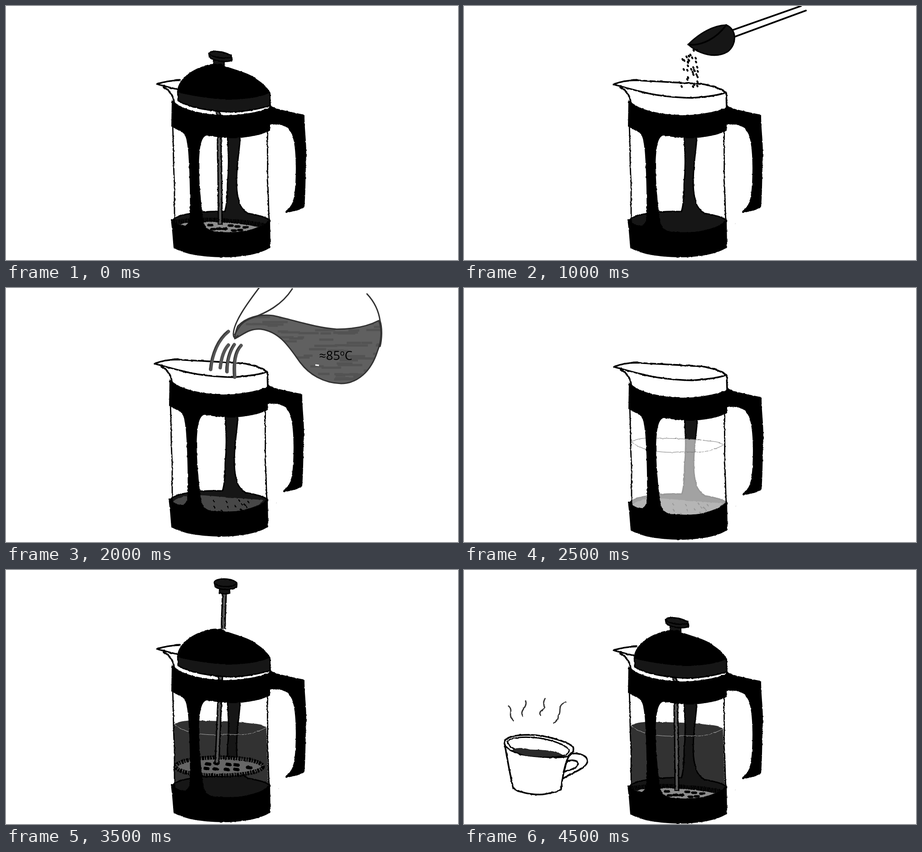
These frames come from a looping animation (998 by 561 pixels, 5000 ms). An HTML page:

```html
<!DOCTYPE html>
<html lang="en">
<head>
<meta charset="utf-8">
<title>French press coffee</title>
<style>
  html, body { margin: 0; width: 100%; height: 100%; overflow: hidden; background: #fff; }
  svg { display: block; width: 100%; height: 100%; }
  .scene { visibility: hidden; animation: show 5s step-end infinite; animation-delay: calc((var(--step) - 10) * .5s); }
  @keyframes show { 0% { visibility: visible; } 10%, 100% { visibility: hidden; } }
  .line { fill: none; stroke: #000; stroke-width: 3.6; stroke-linecap: round; stroke-linejoin: round; }
  .dark { fill: #161616; stroke: #000; stroke-width: 3; stroke-linejoin: round; }
  .thin { stroke-width: 2.8; }
  .grey { stroke: #333; stroke-width: 3; }
  .rod { fill: none; stroke: #000; stroke-width: 11; }
  .core { fill: none; stroke: #575757; stroke-width: 5; }
  .stream { fill: none; stroke: #555; stroke-width: 7.5; stroke-linecap: round; }
  .surface { fill: none; stroke: #aaa; stroke-width: 1; }
  text { font: 27px "Open Sans", "Noto Sans", sans-serif; }
</style>
</head>
<body>
<svg viewBox="0 0 998 561">
  <defs>
    <filter id="ink" filterUnits="userSpaceOnUse" x="0" y="-20" width="998" height="600">
      <feTurbulence type="fractalNoise" baseFrequency=".14" numOctaves="2" seed="4"/>
      <feDisplacementMap in="SourceGraphic" scale="3" xChannelSelector="R" yChannelSelector="G"/>
    </filter>

    <g id="back">
      <path class="dark" d="M365 470C378 456 430 449 480 451C483 442 486 420 486 390C490 350 488 320 486 285H514C513 310 509 330 507 360C505 395 506 415 514 437C519 446 524 451 531 455C555 459 574 465 579 470C560 505 390 515 365 470Z"/>
    </g>

    <g id="front">
      <path class="line thin" d="M365 260C367 300 366 350 369 390V472M575 270C573 310 576 340 574 380C577 410 576 440 578 470"/>
      <path d="M363 205C380 219 398 227 425 232C450 237 475 239 495 238C530 236 560 229 577 222L581 217L590 222C610 228 634 233 656 237C656 270 660 290 660 325C658 365 659 400 656 441C651 447 632 450 617 454Q611 454 617 447C631 439 634 419 636 390C638 350 637 310 630 285C623 264 610 256 580 259L580 272C562 282 530 288 500 289C478 289 460 286 440 283C427 286 424 312 423 350C424 400 428 430 432 468C435 484 441 492 455 495C485 498 520 497 540 491C558 486 570 481 580 467L581 530C557 547 510 552 475 552C430 551 392 546 367 531L364 495L361 469L366 468C371 480 385 484 394 481C400 478 402 471 403 462C404 410 402 350 399 315C396 290 393 278 384 275L362 263Z"/>
      <path class="line" d="M345 176C357 183 367 194 368 210M579 188L580 222"/>
      <circle cx="599" cy="478" r=".8" fill="#ccc"/>
    </g>

    <path id="rim" class="line" d="M330 170C345 164 362 161 382 161C440 165 505 167 530 170C552 174 568 181 578 188C560 195 535 198 503 200C460 199 420 194 390 186C365 180 345 174 330 170Z"/>

    <g id="lid">
      <path class="line" d="M381 161C365 161 345 165 330 169C345 174 360 177 378 182"/>
      <path class="dark" d="M376 183L377 206C400 220 440 229 495 231C530 230 560 223 580 217L579 188Z"/>
      <path d="M375 188C375 160 404 139 435 129C455 123 470 123 482 130C510 140 536 146 551 159C565 168 576 179 580 188C560 200 520 203 490 204C440 202 405 194 375 188Z"/>
    </g>

    <g id="lowKnob">
      <path d="M455 116L480 121L478 129H454Z" fill="#161616" stroke="#000" stroke-width="2"/>
      <path class="dark" d="M445 101C450 95 474 96 494 106L495 117C486 122 455 119 446 110Z"/>
      <path class="line thin" d="M446 102C455 112 480 114 494 110"/>
    </g>

    <g id="highKnob">
      <path class="rod" stroke-width="10" d="M479 46C479 75 476 100 477 126"/>
      <path class="core" d="M479 48C479 75 476 100 477 126"/>
      <path class="dark" d="M469 34L468 46Q480 49 491 46L490 35Z"/>
      <path class="dark" d="M457 22C460 12 496 12 507 24L506 33C495 41 468 39 459 32Z"/>
      <path class="line thin" d="M457 24C466 34 495 34 507 25"/>
    </g>

    <g id="lowRod">
      <path class="rod" d="M465 230C471 260 466 300 469 350L470 480"/>
      <path class="core" d="M465 230C471 260 466 300 469 350L470 478"/>
    </g>
    <g id="highRod">
      <path class="rod" d="M471 230L464 400L463 424"/>
      <path class="core" d="M471 230L464 400L463 420"/>
    </g>

    <g id="grounds">
      <path fill="#474747" d="M371 475C384 460 420 460 440 461C480 464 530 469 570 471C563 486 520 498 480 498C420 495 380 491 371 475Z"/>
      <path id="specks" class="line" stroke-width="2.4" style="stroke-width:2.4"/>
    </g>

    <g id="pressed">
      <path fill="#8c8c8c" d="M431 475C470 472 525 478 553 485C540 491 518 498 475 497C449 495 438 489 431 475ZM382 481Q391 474 400 476L398 481Z"/>
      <path d="M372 474C425 465 510 470 568 482" fill="none" stroke="#000" stroke-width="10" stroke-dasharray="3 1.6 2 1"/>
      <path id="pressedHoles" class="line" style="stroke-width:5.5"/>
    </g>

    <g id="raised">
      <ellipse cx="468" cy="429" rx="97" ry="21" fill="#666"/>
      <ellipse cx="468" cy="429" rx="96" ry="20" fill="none" stroke="#000" stroke-width="9" stroke-dasharray="5 1.5 3 2"/>
      <path id="raisedHoles" class="line" style="stroke-width:7"/>
    </g>

    <path id="volume" d="M368 336C380 328 402 326 430 328C470 328 510 330 539 334C560 335 570 339 572 343L577 470C530 510 400 510 368 472Z"/>
    <path id="surface" d="M368 336C376 338 378 345 389 348C405 355 430 359 460 359C485 356 503 360 528 358C545 354 560 350 571 343"/>

    <clipPath id="kettleClip"><use href="#kettleWater"/></clipPath>
    <path id="kettleWater" d="M512 84C530 65 558 57 590 61C640 72 680 87 730 91C770 91 802 83 823 72C831 90 829 118 820 140C806 184 776 211 740 211C700 210 669 190 650 165C626 132 606 97 563 91C535 89 523 104 505 112Q506 97 512 84Z"/>

    <g id="kettle">
      <use href="#kettleWater" fill="#606060"/>
      <path id="wash" clip-path="url(#kettleClip)" fill="none" stroke="#444" stroke-width="5" opacity=".45"/>
      <use href="#kettleWater" class="line grey"/>
      <path class="line grey" d="M560 -2C532 35 503 75 502 101C502 111 506 112 512 105M632 2C609 38 574 55 544 66C522 73 515 84 505 103M797 13C814 31 823 51 826 73C831 88 830 113 826 129"/>
      <path d="M683 170L691 171" stroke="#fff" stroke-width="3"/>
      <path class="stream" d="M491 96C469 113 455 145 452 180M491 126C479 139 475 158 473 176M504 125C491 144 488 165 488 185M519 127C505 142 503 165 505 197"/>
      <path class="line" style="stroke:#333;stroke-width:1.8" d="M488 96C467 114 453 145 449 180M501 126C489 144 485 165 485 185M516 128C502 144 500 165 502 197"/>
      <text x="728" y="159" text-anchor="middle">≈85ºC</text>
    </g>

    <g id="scoop">
      <path class="line" d="M585 56L744 0M592 70L755 10"/>
      <path class="dark" d="M495 85C520 60 550 43 579 42C602 51 604 84 582 101C557 116 520 108 495 85Z"/>
      <path class="line" d="M495 85C525 89 558 71 579 42"/>
      <path id="falling" class="line" style="stroke-width:4"/>
    </g>

    <g id="spoon">
      <path class="line" style="stroke-width:8" d="M526 125L479 350"/>
      <path class="line" style="stroke:#777;stroke-width:3" d="M526 125L479 350"/>
    </g>

    <g id="cup">
      <path class="line" d="M89 380C91 370 110 364 145 364C185 365 230 380 241 391C243 398 240 407 232 410C222 417 155 413 125 407C101 400 88 390 89 380C96 420 102 455 109 483C130 494 160 498 178 495C195 492 210 489 214 485L217 464C224 422 230 412 237 404"/>
      <path class="line thin" d="M96 379C102 370 130 367 165 371C198 376 225 387 232 397C234 406 222 411 205 412C165 414 103 404 96 379Z"/>
      <path fill="#2c2c2c" stroke="#111" d="M107 398C114 392 134 393 145 397C165 398 200 397 218 409C199 414 158 413 135 410Z"/>
      <path class="line" d="M237 406C253 403 273 410 273 422C270 439 243 445 218 461M227 422C238 419 252 420 252 428C248 440 233 441 220 446Z"/>
      <path class="line thin" style="stroke:#333" d="M98 300C109 309 99 318 104 326L109 332M136 289C141 302 125 309 128 318L130 323M179 284C171 296 182 301 174 309C166 312 167 319 169 321M225 292C204 298 217 314 208 322C209 330 203 336 198 338"/>
    </g>
  </defs>
  <g id="stage"></g>
</svg>
<script>
  const byId = id => document.getElementById(id);
  const use = (id, attrs = "") => `<use href="#${id}" ${attrs}/>`;

  let seed = 7;
  const random = () => (seed = seed * 16807 % 2147483647) / 2147483647;
  const dashes = (points, dx, dy) => points.map(([x, y]) => `M${x} ${y}l${dx} ${dy}`).join("");
  const scatter = (count, place) => Array.from({ length: count }, place);

  byId("specks").setAttribute("d", dashes([[460, 472], [461, 485], [488, 474], [491, 485],
    [507, 483], [516, 471], [522, 479], [528, 480], [536, 474], [532, 485], [478, 494], [520, 491]], 2, 3));
  byId("pressedHoles").setAttribute("d", dashes([[444, 481], [450, 490], [463, 489], [475, 489],
    [489, 482], [504, 484], [522, 486], [496, 493], [510, 492]], 8, 0));
  byId("raisedHoles").setAttribute("d", dashes([[440, 423], [458, 422], [485, 424], [502, 425],
    [436, 433], [456, 434], [481, 435], [502, 435], [530, 431]], 7, 1));
  byId("falling").setAttribute("d", dashes(scatter(34, () => [480 + random() * 38, 92 + random() * 92]), 1, 2));
  byId("wash").setAttribute("d", scatter(95, () =>
    `M${520 + random() * 300} ${64 + random() * 144}h${14 + random() * 42}`).join(""));

  const coffee = use("volume", 'fill="#333"');
  const fullPot = coffee + `<g clip-path="url(#potClip)">${use("back")}</g>`;
  const line = use("surface", 'class="surface"')
    + '<path class="surface" stroke-dasharray="3 2" d="M572 343L576 466"/>';
  const water = use("grounds") + use("volume", 'fill="#fff" opacity=".6"')
    + use("surface", 'class="surface" style="stroke:#777"')
    + '<path class="surface" style="stroke:#777" d="M368 336C380 328 402 326 430 328C470 328 510 330 539 334C560 335 570 339 572 343"/>';
  const pressed = use("pressed") + use("lowRod");
  const lowLid = use("lowKnob") + use("lid");
  const highLid = use("highKnob") + use("lid");
  const brewed = coffee + use("back") + line;
  const raised = brewed + use("raised") + use("highRod");
  const rim = use("rim");

  // Each scene: pot offset, layers behind the frame, layers before it, fixed extras.
  const scenes = [
    [3, 3, use("back") + pressed, lowLid],
    [0, 0, use("back"), rim],
    [0, 3, use("back"), rim, use("scoop")],
    [-2, 4, use("back") + use("grounds"), rim],
    [-2, -3, use("back") + use("grounds"), rim, use("kettle")],
    [1, 4, use("back") + water, rim],
    [3, 6, brewed + use("spoon"), rim],
    [3, 5, raised, highLid],
    [-2, 2, brewed + pressed, lowLid],
    [0, 8, brewed + pressed, lowLid, use("cup", 'filter="url(#ink)"')]
  ];

  byId("stage").innerHTML = scenes.map(([x, y, behind, before, extra = ""], step) =>
    `<g class="scene" style="--step:${step}">
      <g transform="translate(${x} ${y})"><g filter="url(#ink)">${behind}${use("front")}${before}</g></g>${extra}
    </g>`).join("");
</script>
</body>
</html>
```
